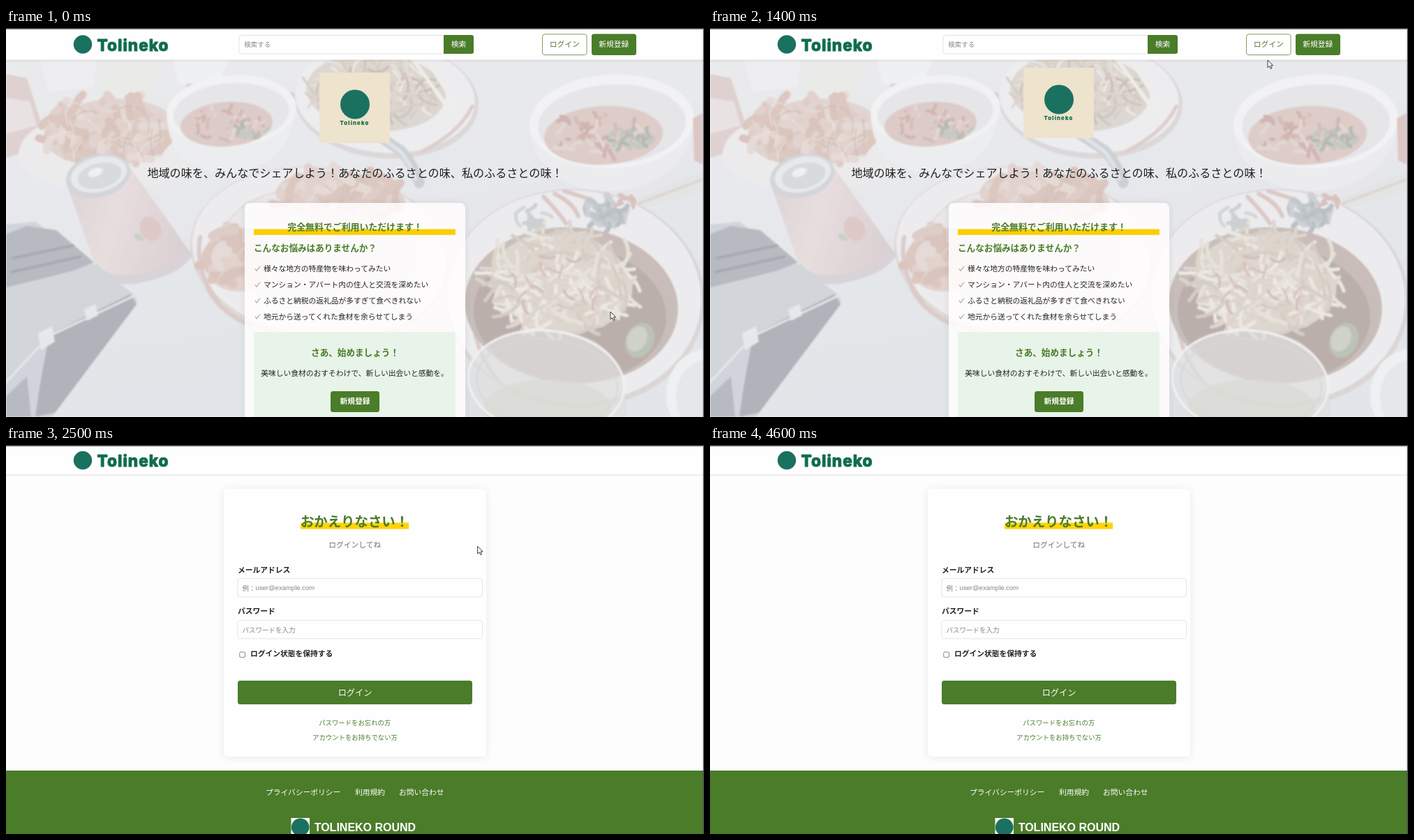
Write an HTML page that moves like this. It is 1000 px wide and 558 px high and loops after 4.7 s.

```html
<!DOCTYPE html>
<html lang="ja">
<head>
<meta charset="utf-8">
<title>Tolineko</title>
<style>
html, body { margin: 0; width: 100%; height: 100%; overflow: hidden; background: #fefdfe; }
svg { display: block; width: 100%; height: 100%; }
text { font-family: "Noto Sans CJK JP", "Noto Sans CJK", sans-serif; white-space: pre; }
.brand { font-family: Inter, "DejaVu Sans", sans-serif; font-weight: 800; fill: #0f6d4a; stroke: #0f6d4a; stroke-linejoin: round; }
.arial { font-family: "Liberation Sans", sans-serif; }
.bubble { font-family: "Open Sans", "Noto Sans", sans-serif; }
</style>
</head>
<body>
<svg id="stage" viewBox="0 0 1000 558" preserveAspectRatio="none"></svg>
<script>
const LOOP = 4700, STEP = 100;
const GREEN = '#4a7c29', TEAL = '#1b7160', YELLOW = '#ffd400';

let seed = 41;
const rnd = () => (seed = seed * 16807 % 2147483647) / 2147483647;

// Drawing helpers
const rect = (x, y, w, h, fill, r = 0, more = '') =>
  `<rect x="${x}" y="${y}" width="${w}" height="${h}" rx="${r}" fill="${fill}" ${more}/>`;
const oval = (x, y, rx, ry, fill, turn = 0, more = '') =>
  `<ellipse cx="${x}" cy="${y}" rx="${rx}" ry="${ry}" fill="${fill}" transform="rotate(${turn} ${x} ${y})" ${more}/>`;
const shape = (d, fill, more = '') => `<path d="${d}" fill="${fill}" ${more}/>`;
const line = (d, color, w, more = '') =>
  `<path d="${d}" fill="none" stroke="${color}" stroke-width="${w}" stroke-linecap="round" ${more}/>`;
const text = (x, mid, size, str, fill = '#222', more = '') =>
  `<text x="${x}" y="${mid + size * 0.37}" font-size="${size}" fill="${fill}" ${more}>${str}</text>`;
const BOLD = 'font-weight="700"', MID = 'text-anchor="middle"';
const brand = (x, y, size, gap, edge) =>
  `<text class="brand" x="${x}" y="${y}" font-size="${size}" letter-spacing="${gap}" stroke-width="${edge}">Tolineko</text>`;

// Random curved strokes scattered over an oval
function curls(n, cx, cy, rx, ry, len, w, colors) {
  let out = '';
  for (let i = 0; i < n; i++) {
    const a = rnd() * 6.283, r = Math.sqrt(rnd()), d = rnd() * 6.283;
    const px = Math.cos(d) * len, py = Math.sin(d) * len;
    const x = cx + Math.cos(a) * r * rx - px / 2, y = cy + Math.sin(a) * r * ry - py / 2;
    const bend = (rnd() - 0.5) * 0.9;
    out += line(`M${x.toFixed(1)} ${y.toFixed(1)}q${(px / 2 - py * bend).toFixed(1)} ${(py / 2 + px * bend).toFixed(1)} ${px.toFixed(1)} ${py.toFixed(1)}`,
      colors[Math.floor(rnd() * colors.length)], w);
  }
  return out;
}

const SHRIMP = ['#dfc4ba', '#d9b5a8', '#e4d0c7', '#dbbcb0', '#d5b0a3'];
const STRIPS = ['#e4dccd', '#d5c9b8', '#ece5d9', '#cdbfae', '#dcc9bd'];
const HERBS = ['#a5ad9f', '#b3b8aa', '#9ba497'];
const SAUCE = ['#d0a49d', '#ddbcb4', '#c99a92', '#e2cac4'];

function photo() {
  return rect(0, 44, 1000, 514, 'url(#table)') +
    // far left: tin, glass, cup
    shape('M0 66L30 72 58 160 50 172 0 186Z', '#dcc2be') +
    shape('M0 100L34 105 44 140 0 152Z', '#e9dcda') +
    shape('M50 46H130L124 84 62 92Z', '#eeedef') +
    shape('M128 46H224L206 96Q170 108 142 98Z', '#e9e9e2') +
    shape('M240 46H320L304 78Q270 92 246 78Z', '#efeff1') +
    line('M262 84L362 92Q400 90 432 104', '#c2c5cc', 8) +
    // shrimp pile
    oval(158, 172, 140, 62, '#ebe8e9', -4) +
    oval(150, 150, 96, 48, '#dfc8c0', -4) +
    curls(64, 148, 148, 92, 44, 30, 11, SHRIMP) +
    curls(22, 150, 150, 88, 40, 38, 1.3, ['#c9a196', '#eadbd4']) +
    // noodle plate
    oval(545, 104, 132, 83, '#d6cccc', 4) +
    oval(543, 100, 129, 79, '#ecebed', 4) +
    oval(530, 92, 100, 56, '#d6ccc3', 4) +
    curls(130, 525, 88, 92, 46, 30, 3.2, STRIPS.concat('#c4b2a2', '#bca899')) +
    line('M598 176Q650 150 668 112', '#d8bbb7', 5) +
    line('M584 46L640 124M604 46L648 118', '#f1ece7', 5) +
    line('M520 146L566 176Q584 196 592 222', '#bcc2cb', 15) +
    line('M530 152L566 178Q580 196 586 216', '#d7dbe1', 6) +
    // left bowl
    shape('M230 124C232 176 260 206 316 208C372 206 412 172 416 112Z', '#ebebed') +
    oval(323, 119, 93, 51, '#f4f3f4', -4) +
    oval(323, 122, 83, 43, '#e3e1e4', -4) +
    oval(316, 138, 66, 32, '#d9b9b3', -4) +
    curls(30, 314, 138, 54, 23, 14, 4, SAUCE) +
    curls(18, 352, 146, 22, 11, 9, 4, HERBS) +
    // right bowl
    shape('M750 142C754 196 792 232 862 234C934 232 984 190 986 130Z', '#ebeaec') +
    oval(868, 134, 118, 67, '#f4f3f4', -3) +
    oval(868, 138, 106, 57, '#e3e0e3', -3) +
    oval(856, 154, 85, 42, '#d8bbb4', -3) +
    curls(44, 846, 154, 68, 31, 16, 5, SAUCE) +
    curls(26, 896, 158, 32, 15, 11, 5, HERBS) +
    shape('M984 130L998 122V196L986 190Z', '#d9b4b0') +
    shape('M890 250L998 206V236L900 262Z', '#e0dedd') +
    line('M906 252L996 218', '#cfc7c4', 3) +
    // centre plate
    oval(450, 326, 187, 126, '#dacdcb', 8) +
    oval(449, 323, 183, 121, '#ebeaec', 8) +
    oval(449, 320, 140, 88, '#e5e2e4', 8, 'stroke="#dcd0ce" stroke-width="2"') +
    line('M278 300Q270 350 304 392M288 372Q308 410 350 426', '#d6bab5', 6) +
    oval(480, 242, 92, 36, '#dfc5bc', 6) +
    curls(40, 480, 240, 84, 32, 36, 12, SHRIMP) +
    oval(332, 332, 50, 46, '#e1c8be') +
    curls(18, 326, 330, 38, 40, 32, 13, SHRIMP) +
    // drink tin
    shape('M87 224L132 352Q146 372 190 366Q250 354 267 326L178 200Z', 'url(#tin)') +
    shape('M132 352Q146 372 190 366Q250 354 267 326L262 318Q238 346 190 354Q150 358 129 342Z', '#cfc6c9') +
    oval(132, 212, 47, 31, '#c7c9ce', -14) +
    oval(133, 210, 41, 25, '#e4e5e8', -14) +
    oval(134, 212, 32, 18, '#cfd1d6', -14) +
    oval(128, 207, 11, 6, '#eeeff1', -20) +
    oval(207, 288, 15, 18, '#dcb6b4', -28) +
    oval(190, 300, 8, 4, '#bcc3b4', 30) +
    // right plate
    oval(815, 388, 186, 157, '#d5c9c8', 4) +
    oval(814, 385, 182, 152, '#ebeaec', 4) +
    line('M770 242Q790 262 802 280M786 238Q812 250 820 270M800 234L838 246', '#d8b6b0', 6) +
    curls(26, 862, 266, 32, 20, 18, 7, ['#aeb5ba', '#bec3c7', '#a3abb1']) +
    curls(8, 888, 250, 14, 9, 10, 5, ['#d3aba6']) +
    curls(12, 752, 272, 24, 14, 16, 5, ['#bcc2c3', '#c8cbcc']) +
    line('M668 420Q676 472 706 506', '#d6b9b4', 5) +
    oval(810, 398, 153, 112, '#baa69d', 4) +
    oval(808, 410, 138, 98, '#a6938a', 4) +
    oval(796, 366, 102, 70, '#d6cabb', 8) +
    curls(200, 796, 362, 104, 70, 44, 5, STRIPS) +
    curls(14, 800, 376, 80, 52, 20, 3, ['#d0aca4', '#c8a39b']) +
    oval(908, 448, 20, 26, '#a5ae98', 25) +
    oval(904, 446, 14, 19, '#c0c5b4', 25) +
    // glass and small bowl in front
    shape('M660 500Q672 434 770 433Q872 436 886 512L890 558H660Z', '#dad9d7', 'opacity=".72"') +
    oval(776, 546, 92, 42, '#d2d0c4', 0, 'opacity=".75"') +
    oval(774, 508, 112, 74, 'none', 6, 'stroke="#f2f2f2" stroke-width="3"') +
    oval(775, 510, 101, 64, 'none', 6, 'stroke="#cfcdcc" stroke-width="2"') +
    oval(1000, 522, 54, 62, '#f0eff1', 14) +
    oval(1006, 526, 46, 52, '#e2e3e7', 14) +
    // black case
    shape('M0 282L42 278 186 384 188 396 66 558H0Z', '#c3c8d0') +
    shape('M0 296L30 284 72 290 126 336 92 350 0 372Z', '#9fa3ab') +
    shape('M0 374L96 348 130 338 176 380 62 440 0 500Z', '#c5cad2') +
    shape('M62 440L178 382 187 396 70 552 40 558Z', '#9498a2') +
    shape('M0 502L58 446 42 558H0Z', '#c3c8d0') +
    shape('M0 528L30 500 36 558H0Z', '#9fa3ac') +
    line('M0 508L62 442 184 384', '#e2e5ea', 3) +
    shape('M46 438L66 428 70 450 50 462ZM112 404L128 396 132 412 116 420Z', '#e3e6ea') +
    line('M10 330L96 312M8 350L106 328', '#888c95', 4) +
    // pale veil over the whole picture
    rect(0, 44, 1000, 514, '#eef0f5', 0, 'opacity=".3"');
}

function header(h, dy) {
  return rect(0, 0, 1000, h, '#fffeff', 0, 'filter="url(#drop)"') +
    `<circle cx="110" cy="${23.5 + dy}" r="13.2" fill="${TEAL}"/>` + brand(130.5, 32.5 + dy, 22.6, 1, 0.9);
}

function home() {
  const wants = ['様々な地方の特産物を味わってみたい', 'マンション・アパート内の住人と交流を深めたい',
    'ふるさと納税の返礼品が多すぎて食べきれない', '地元から送ってくれた食材を余らせてしまう'];
  const list = wants.map((s, i) => {
    const y = 345 + i * 22.9;
    return line(`M357 ${y + 0.5}l2.2 3 4.6-6.6`, '#6c9352', 0.9) + text(369, y, 10.75, s);
  }).join('');
  return `<g filter="url(#soft)">${photo()}</g>` + header(45.5, 0) +
    rect(334, 10.5, 294, 26.5, '#fffeff', 3.5, 'stroke="#e0e1e5"') +
    text(341, 23.5, 9.6, '検索する', '#8b8b8b') +
    shape('M627 10H667Q670 10 670 13V34Q670 37 667 37H627Z', GREEN) +
    text(637.8, 23, 10.75, '検索', '#fff') +
    rect(768.5, 8.9, 63.6, 29.7, '#fffeff', 3.5, 'stroke="#6f9456" stroke-width=".9"') +
    text(778.8, 23, 10.75, 'ログイン', GREEN) +
    rect(839, 8.5, 64, 30.4, GREEN, 3.5) + text(849.3, 23, 10.75, '新規登録', '#fff') +
    text(500, 208, 16.1, '地域の味を、みんなでシェアしよう！あなたのふるさとの味、私のふるさとの味！', '#1f1f1f', MID) +
    rect(342, 251, 316, 330, '#fffdfd', 7, 'opacity=".88" filter="url(#glow)"') +
    rect(355, 288.5, 289, 8.3, '#f9cf00') +
    text(500, 285.5, 12.9, '完全無料でご利用いただけます！', GREEN, `${BOLD} ${MID}`) +
    text(355, 315.5, 12.6, 'こんなお悩みはありませんか？', GREEN, BOLD) + list +
    rect(355, 436, 289, 130, '#e8f4e9', 4) +
    text(500, 465, 12.6, 'さあ、始めましょう！', GREEN, `${BOLD} ${MID}`) +
    text(499.5, 495, 10.76, '美味しい食材のおすそわけで、新しい出会いと感動を。', '#222', MID) +
    rect(465, 521, 70, 30, GREEN, 3.5) +
    text(500, 535.5, 10.75, '新規登録', '#fff', `${BOLD} ${MID}`) +
    `<g id="badge">${rect(449, 0, 101, 101, '#eee3cc')}<circle cx="500" cy="45.5" r="21" fill="${TEAL}"/>${brand(478.5, 74.5, 7.7, 1.2, 0.2)}</g>`;
}

function login() {
  const field = y => rect(332, y, 350.5, 26.3, '#fffeff', 3.5, 'stroke="#e4e3ec"');
  return rect(0, 0, 1000, 558, '#fefdfe') + header(42, -1.5) +
    rect(312, 63, 376, 384, '#fffeff', 6, 'filter="url(#glow)"') +
    rect(422, 111.5, 155, 9, YELLOW) +
    text(499.5, 109.5, 19.4, 'おかえりなさい！', GREEN, `${BOLD} ${MID}`) +
    text(499.8, 143, 10.75, 'ログインしてね', '#6c6c6c', MID) +
    text(332, 179, 10.75, 'メールアドレス', '#222', BOLD) + field(191.6) +
    text(338.5, 205, 9.5, '例：', '#858585') +
    `<text class="arial" x="357.5" y="208.2" font-size="9.5" fill="#858585">user@example.com</text>` +
    text(332, 238.5, 10.75, 'パスワード', '#222', BOLD) + field(251.5) +
    text(338.5, 265, 9.5, 'パスワードを入力', '#858585') +
    rect(334.8, 297, 7.6, 7.6, '#fff', 1.5, 'stroke="#767676" stroke-width=".9"') +
    text(350, 299, 10.75, 'ログイン状態を保持する', '#222', BOLD) +
    rect(332, 338, 336, 34, GREEN, 3.5) + text(500, 355, 12.2, 'ログイン', '#fff', MID) +
    text(499.7, 398.5, 9.4, 'パスワードをお忘れの方', GREEN, MID) +
    text(500, 419.5, 9.4, 'アカウントをお持ちでない方', GREEN, MID) +
    rect(0, 467, 1000, 91, GREEN) +
    text(372, 498.5, 10.75, 'プライバシーポリシー', '#fff') +
    text(500, 498.5, 10.75, '利用規約', '#fff') + text(563, 498.5, 10.75, 'お問い合わせ', '#fff') +
    rect(408.5, 535, 26.5, 26.5, '#fffeff') + `<circle cx="421.7" cy="548.2" r="12.8" fill="${TEAL}"/>` +
    `<text class="arial" x="441.7" y="554" font-size="16" font-weight="700" fill="#fff">TOLINEKO ROUND</text>`;
}

const stage = document.getElementById('stage');
stage.innerHTML = `<defs>
  <linearGradient id="table" x1="0" y1="0" x2=".3" y2="1"><stop offset="0" stop-color="#e9e8e9"/><stop offset="1" stop-color="#dce0e6"/></linearGradient>
  <linearGradient id="tin" x1="0" y1="0" x2="1" y2=".25"><stop offset="0" stop-color="#d8c5c6"/><stop offset=".45" stop-color="#e6d5d4"/><stop offset="1" stop-color="#d6c2c4"/></linearGradient>
  <filter id="soft" x="0" y="0" width="1" height="1" color-interpolation-filters="sRGB"><feGaussianBlur stdDeviation="1"/><feColorMatrix type="saturate" values=".85"/></filter>
  <filter id="drop" x="-5%" y="-20%" width="110%" height="160%"><feDropShadow dx="0" dy="1" stdDeviation="1.5" flood-color="#445" flood-opacity=".18"/></filter>
  <filter id="glow" x="-10%" y="-10%" width="120%" height="120%"><feDropShadow dx="0" dy="1" stdDeviation="5" flood-color="#465046" flood-opacity=".13"/></filter>
</defs>
<g id="home">${home()}</g><g id="login">${login()}</g>
<g id="bubble">${shape('M0 547H106Q109 547 109 550V558H0Z', '#3b3c3b')}<text class="bubble" x="3" y="557.6" font-size="7.4" fill="#d8d8d8">localhost:3000/users/sign_in</text></g>
${rect(0, 0, 1000, 1.7, '#3c3a46')}${rect(998.7, 0, 1.3, 558, '#4a4954')}
<path id="cursor" d="M0 0V10.8L2.5 8.6 4.2 12.4 6 11.6 4.3 7.9H7.6Z" fill="#fff" stroke="#26262c" stroke-width=".9" stroke-linejoin="round"/>`;

// time, x, y of the pointer tip
const PATH = [
  [0, 866, 407], [700, 869, 230], [1400, 799, 46], [1600, 794, 30], [2000, 793, 29],
  [2200, 790, 32], [2900, 523, 296], [3500, 530, 190], [3800, 539, 89], [4100, 548, 2]
];

function pointer(t) {
  const i = PATH.findIndex(p => p[0] > t);
  if (i < 0) return PATH[PATH.length - 1].slice(1);
  const a = PATH[i - 1], b = PATH[i], k = (t - a[0]) / (b[0] - a[0]);
  return [1, 2].map(n => a[n] + (b[n] - a[n]) * k);
}

const part = id => document.getElementById(id);
const show = (id, on) => part(id).setAttribute('display', on ? 'inline' : 'none');

function draw(now) {
  const t = Math.floor(now % LOOP / STEP) * STEP;
  const rise = Math.max(0, 1 - t / 1400) ** 1.5;
  show('home', t < 2000);
  show('login', t >= 2000);
  show('bubble', t >= 1900 && t < 2500);
  show('cursor', t < 3000 || (t >= 3500 && t <= 4100));
  part('badge').setAttribute('transform', `translate(0 ${57 + 7 * rise})`);
  part('cursor').setAttribute('transform', `translate(${pointer(t)})`);
}

const start = performance.now();
function tick() {
  draw(performance.now() - start);
  requestAnimationFrame(tick);
}
tick();
</script>
</body>
</html>
```
